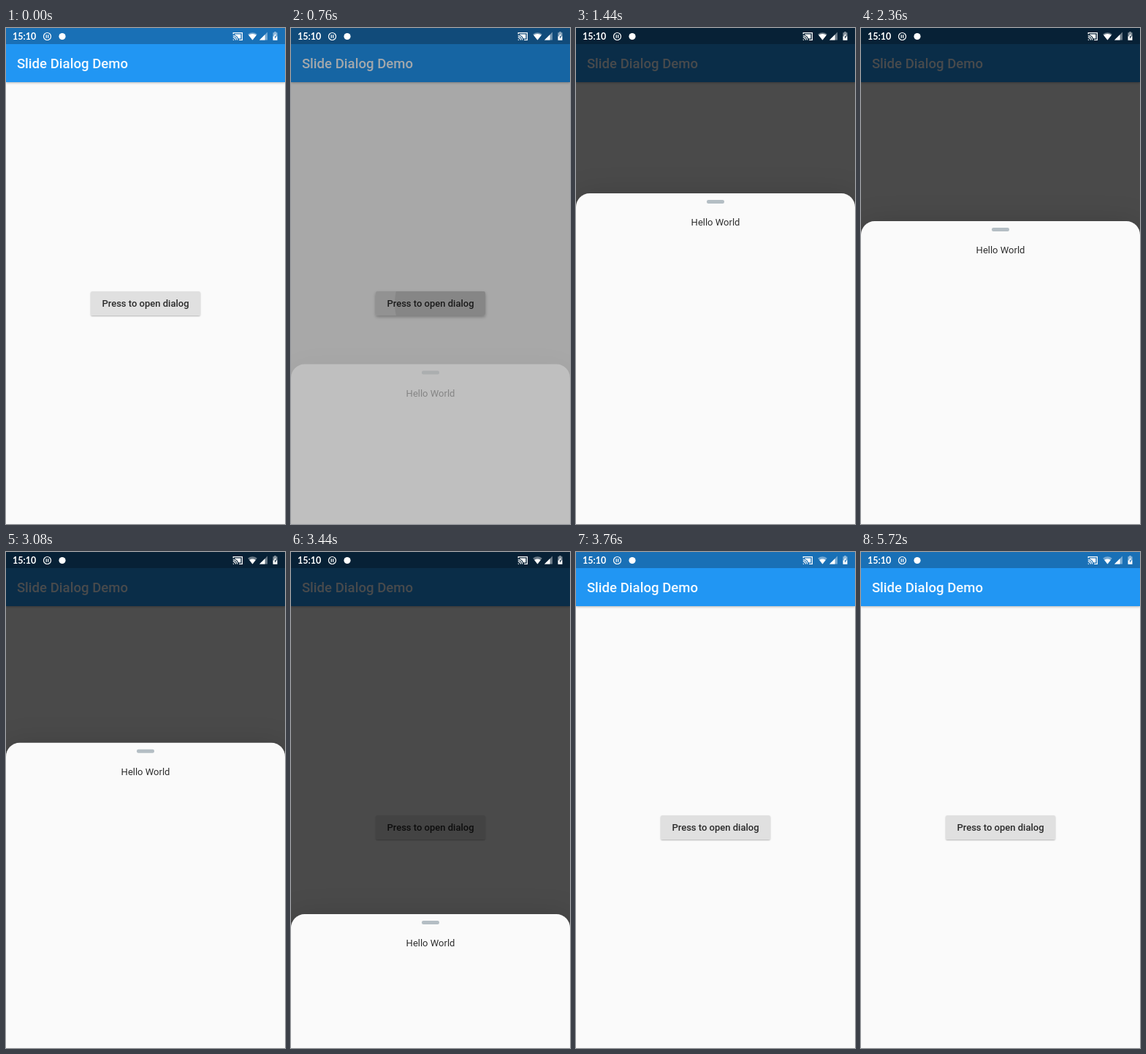
These frames come from a looping animation (382x678 px, 5760 ms). An HTML page:

```html
<!DOCTYPE html>
<html lang="en">
<head>
<meta charset="utf-8">
<title>Slide Dialog Demo</title>
<style>
  html, body { margin: 0; width: 100%; height: 100%; overflow: hidden; }
  #stage {
    position: relative; width: 382px; height: 678px; overflow: hidden;
    background: #fafafa; font: 13px/16px Roboto, sans-serif;
  }
  #stage div, #stage svg { position: absolute; }
  #appbar {
    width: 382px; height: 74px; background: #2196f3;
    box-shadow: 0 1px 3px #00000048;
  }
  #statusbar { width: 382px; height: 22px; background: #1970b6; }
  #title {
    left: 14.9px; top: 38px; white-space: nowrap;
    font-size: 18.58px; line-height: 22px; font-weight: 500; color: #fffffff2;
  }
  #button, #shadow {
    left: 116px; top: 359.5px; width: 150px; height: 33.5px; border-radius: 2px;
  }
  #button { background: #e0e0e0; overflow: hidden; }
  #label {
    width: 100%; text-align: center; line-height: 34px;
    white-space: nowrap; font-weight: 500; color: #000000d0;
  }
  #highlight { inset: 0; background: #000; }
  #splash { background: #000; border-radius: 50%; }
  #barrier { inset: 0; background: #000; }
  #dialog {
    top: 226px; width: 382px; height: 678px; border-radius: 18.6px; background: #fafafa;
    box-shadow: 0 10px 14px -6px #0003, 0 22px 35px 3px #00000024, 0 8px 42px 7px #0000001f;
  }
  #pill { left: 179.4px; top: 9.3px; width: 23.2px; height: 4.6px; border-radius: 2.3px; background: #b4bec4; }
  #message { top: 32px; width: 100%; text-align: center; color: #000000d0; }
  #clock { left: 9px; top: 3.5px; font: 700 12.5px/16px Lato, sans-serif; color: #fff; }
  #signal { transform-origin: 337.5px 16.4px; }
</style>
</head>
<body>
<div id="stage">
  <div id="appbar">
    <div id="statusbar"></div>
    <div id="title">Slide Dialog Demo</div>
  </div>
  <div id="shadow"></div>
  <div id="button">
    <div id="highlight"></div>
    <div id="splash"></div>
    <div id="label">Press to open dialog</div>
  </div>
  <div id="barrier"></div>
  <div id="dialog">
    <div id="pill"></div>
    <div id="message">Hello World</div>
  </div>
  <div id="clock">15:10</div>
  <svg width="382" height="23" fill="#fff">
    <circle cx="56.5" cy="11.5" r="5" fill="none" stroke="#fff" stroke-width="1.2"/>
    <path d="M54.6 9.2h1.3v4.6h-1.3zM57.1 9.2h1.3v4.6h-1.3z"/>
    <circle cx="77" cy="11.5" r="4.6"/>
    <path d="M311.2 8.6V6.6h12.2v9.8h-4.2M310.8 10.6a6 6 0 0 1 6 6M310.8 12.9a3.7 3.7 0 0 1 3.7 3.7"
      fill="none" stroke="#fff" stroke-width="1.2"/>
    <path d="M310.8 15.2a1.5 1.5 0 0 1 1.5 1.5h-1.5zM313.4 8.6h8v5.8h-3a8 8 0 0 0-5-5z"/>
    <path d="M337.5 16.4 331.2 8.5Q337.5 3.9 343.8 8.5z" opacity=".4"/>
    <path id="signal" d="M337.5 16.4 333.2 11Q337.5 8.2 341.8 11z"/>
    <path d="M347 16.6 358 5.6v11z" opacity=".4"/>
    <path d="M347 16.6 354.6 9v7.6z"/>
    <path d="M367.2 5h2.6v1.2h1.7v5h-6v-5h1.7z" opacity=".5"/>
    <path fill-rule="evenodd" d="M365.5 11.2h6v5.6h-6zM368.1 11.2v3.6l2.2-3.6z"/>
    <path d="M369.2 7.6v3.6h-2.4z"/>
  </svg>
</div>
<script>
const LOOP = 5760, TICK = 40, SLIDE = 279;
const el = Object.fromEntries([...document.querySelectorAll('[id]')].map(e => [e.id, e]));
const clamp = x => Math.min(1, Math.max(0, x));
const ramp = (t, from, to) => clamp((t - from) / (to - from));

// CSS-style cubic easing, solved by bisection
function cubic(x1, y1, x2, y2) {
  const at = (a, b, u) => 3 * a * u * (1 - u) ** 2 + 3 * b * u * u * (1 - u) + u ** 3;
  return x => {
    if (x <= 0 || x >= 1) return clamp(x);
    let lo = 0, hi = 1;
    for (let i = 0; i < 24; i++) {
      const mid = (lo + hi) / 2;
      if (at(x1, x2, mid) < x) lo = mid; else hi = mid;
    }
    return at(y1, y2, lo);
  };
}
const ease = cubic(.25, .1, .25, 1);
const easeInOut = cubic(.42, 0, .58, 1);

// Finger drags: [time, offset]; the second one dismisses the dialog
const drag = [
  [1500, 0], [1640, 12], [1800, 30], [1960, 44], [2080, 48], [2200, 46], [2360, 38],
  [2480, 18], [2600, 0], [2780, 0], [3000, 18], [3200, 60], [3360, 142], [3440, 269], [3490, 285]
];
function dragOffset(t) {
  const i = drag.findIndex(p => p[0] > t);
  if (i === 0) return 0;
  if (i < 0) return drag[drag.length - 1][1];
  const [t0, y0] = drag[i - 1], [t1, y1] = drag[i];
  return y0 + (y1 - y0) * ramp(t, t0, t1);
}

function drawButton(t) {
  const fade = 1 - ramp(t, 800, 960);
  const lift = ramp(t, 560, 720) * fade;
  el.shadow.style.boxShadow = `0 ${1 + lift}px ${2 + 2 * lift}px #00000048`;
  el.highlight.style.opacity = .03 * lift;
  const r = 110 * ramp(t, 550, 870);
  Object.assign(el.splash.style, {
    left: 98 - r + 'px', top: 17 - r + 'px', width: 2 * r + 'px', height: 2 * r + 'px',
    opacity: .08 * ramp(t, 540, 620) * fade
  });
}

function draw(t) {
  const shown = t < 2000 ? ramp(t, 662, 1012) : 1 - ramp(t, 3445, 3755);
  const y = dragOffset(t) + SLIDE * (1 - easeInOut(shown));
  el.barrier.style.opacity = .7 * ease(shown);
  el.dialog.style.opacity = shown;
  el.dialog.style.transform = `translateY(${y}px)`;
  el.signal.style.transform = `scale(${t < 2800 ? 1.25 : 1})`;
  drawButton(t);
}

const start = performance.now();
function frame() {
  const t = (performance.now() - start) % LOOP;
  draw(Math.floor(t / TICK) * TICK);
  requestAnimationFrame(frame);
}
frame();
</script>
</body>
</html>
```
